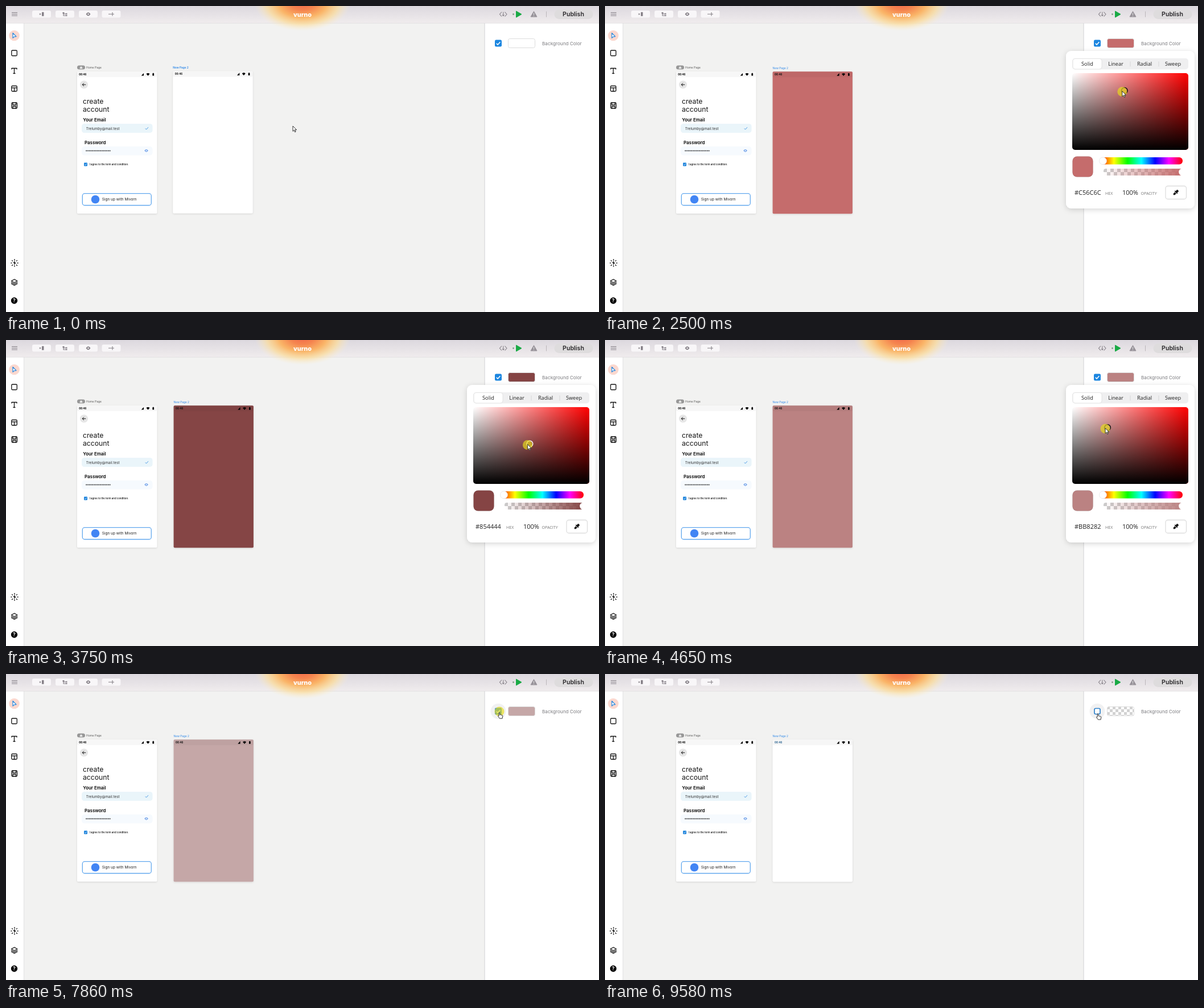
Recreate the animation shown at these times as an HTML page. Size 1042 by 538 pixels, loop 9.65 s.

```html
<!DOCTYPE html>
<html lang="en">
<head>
<meta charset="utf-8">
<title>Page background colour</title>
<style>
html, body { margin: 0; width: 100%; height: 100%; overflow: hidden; background: #f2f2f1; }
svg { display: block; width: 100vw; height: 100vh; font-family: Inter, Roboto, sans-serif; }
.line { fill: none; stroke: #111; stroke-width: 1.3; stroke-linejoin: round; stroke-linecap: round; }
.grey { fill: none; stroke: #858087; stroke-width: 1.1; }
.picker text { font-family: "Open Sans", "Noto Sans", sans-serif; }
</style>
</head>
<body>
<svg viewBox="0 0 1042 538">
  <defs>
    <linearGradient id="bar" x2="0" y2="1"><stop stop-color="#dcd8de"/><stop offset="1" stop-color="#f0eced"/></linearGradient>
    <radialGradient id="glow">
      <stop stop-color="#f26a4b"/><stop offset=".25" stop-color="#f5854f"/>
      <stop offset=".5" stop-color="#fab568"/><stop offset=".75" stop-color="#fbdc9c" stop-opacity=".75"/>
      <stop offset="1" stop-color="#faeccb" stop-opacity="0"/>
    </radialGradient>
    <linearGradient id="saturation"><stop stop-color="#fff"/><stop offset="1" stop-color="#f00"/></linearGradient>
    <linearGradient id="darkness" x2="0" y2="1"><stop stop-opacity="0"/><stop offset="1"/></linearGradient>
    <linearGradient id="hue">
      <stop stop-color="#f00"/><stop offset=".167" stop-color="#ff0"/><stop offset=".333" stop-color="#0f0"/>
      <stop offset=".5" stop-color="#0ff"/><stop offset=".667" stop-color="#00f"/>
      <stop offset=".833" stop-color="#f0f"/><stop offset="1" stop-color="#f00"/>
    </linearGradient>
    <linearGradient id="alpha">
      <stop id="alphaStart" stop-opacity="0"/><stop id="alphaEnd" offset="1"/>
    </linearGradient>
    <pattern id="checker" width="12" height="12" patternUnits="userSpaceOnUse" x="876" y="286">
      <rect width="12" height="12" fill="#fff"/><path d="M0 0h6v6h-6zM6 6h6v6h-6z" fill="#ccc"/>
    </pattern>
    <pattern id="smallChecker" width="10" height="10" patternUnits="userSpaceOnUse" x="882" y="57">
      <rect width="10" height="10" fill="#fff"/><path d="M0 0h5v5h-5zM5 5h5v5h-5z" fill="#d2d2d2"/>
    </pattern>
    <filter id="soft" x="-20%" y="-20%" width="140%" height="140%">
      <feDropShadow dx="0" dy="1" stdDeviation="1.5" flood-opacity=".13"/>
    </filter>
    <filter id="deep" x="-20%" y="-20%" width="140%" height="140%">
      <feDropShadow dx="0" dy="2" stdDeviation="5" flood-opacity=".17"/>
    </filter>
    <g id="signals">
      <path d="M117 7.5v-4.6l-4.3 4.6zM121.5 4.3q3-2.7 6 0l-3 3.4zM132.4 3.4h.7v-.6h1.3v.6h.7v4.2h-2.7z"/>
    </g>
  </defs>

  <rect width="1042" height="538" fill="#f2f2f1"/>
  <rect y="30" width="31" height="508" fill="#fff"/>
  <path d="M31.5 30V538" stroke="#e2e2e2"/>
  <rect x="841" y="30" width="201" height="508" fill="#fff"/>
  <path d="M841 30V538" stroke="#d9d9dc" stroke-width="1.3"/>
  <rect width="1042" height="30" fill="url(#bar)"/>
  <path d="M0 30.2H1042" stroke="#dedbdd" stroke-width=".8"/>
  <ellipse cx="521" cy="-4" rx="84" ry="48" fill="url(#glow)"/>
  <text x="521" y="18.5" font-size="11" font-weight="800" fill="#fff" text-anchor="middle">vurno</text>

  <path class="grey" d="M10 11.5h10M10 14.2h10M10 17h10"/>
  <g fill="#f8f6f8">
    <rect x="46" y="8" width="33" height="12.5" rx="3"/><rect x="87" y="8" width="33" height="12.5" rx="3"/>
    <rect x="128" y="8" width="33" height="12.5" rx="3"/><rect x="168.500" y="8" width="33" height="12.5" rx="3"/>
  </g>
  <g fill="#858087">
    <rect x="63" y="10.800" width="3.500" height="7" rx=".6"/>
    <path d="M99.500 11h3v2.400h-3zM104.500 12.800h3v2h-3zM104.500 15.800h3v2h-3z"/>
    <path d="M140.500 14.300q4-6 8 0q-4 6-8 0z"/>
  </g>
  <circle cx="144.500" cy="14.300" r="1.200" fill="#f8f6f8"/>
  <path class="grey" d="M58.500 14.300h3M60 12.800v3M101 13v4h3.500M101 14h3.500M180 14.300h10M187 11v6.600"/>
  <path class="grey" d="M871 10.500l-3.500 4l3.500 4M876.500 10.500l3.500 4l-3.500 4M873.800 10.500v7M872 15.500l1.800 2l1.800-2"/>
  <circle cx="891.500" cy="14.500" r="1.400" fill="#85a08a"/>
  <path d="M896.500 9v11l9.500-5.500z" fill="#19aa45" stroke="#19aa45" stroke-linejoin="round"/>
  <path d="M927.500 9.500l5.500 9.500h-11z" fill="#98939a" stroke="#98939a" stroke-linejoin="round"/>
  <path d="M927.500 12.500v3.300M927.500 17v1" stroke="#eee"/>
  <path d="M949.500 9.500v10" stroke="#bbb6ba"/>
  <rect x="963.500" y="6" width="68" height="17" rx="8.500" fill="#dedcdd"/>
  <text x="997" y="18.300" font-size="10.600" font-weight="600" fill="#29272a" text-anchor="middle">Publish</text>

  <circle cx="14.500" cy="52" r="9.300" fill="#fbd8cf"/>
  <path d="M12 47.500v8.800l2.300-2.200l3.700-.5z" fill="#fff" stroke="#2688df" stroke-width="1.200" stroke-linejoin="round"/>
  <g class="line">
    <rect x="9.800" y="78" width="9.500" height="9.500" rx="1.500"/>
    <path d="M10 111v-1.500h9v1.500M14.500 109.500v9M13 118.500h3"/>
    <rect x="9.800" y="140.500" width="9.500" height="9.500" rx="1.500"/><path d="M10 143.800h9M14.500 143.800v6"/>
    <rect x="10" y="170" width="9.500" height="10" rx="1.500"/><path d="M12 170v4h5.500v-4M12 180v-3.500h5.500v3.500"/>
    <path d="M9.500 483.500l5.200-3l5.200 3l-5.200 3zM9.500 486l5.200 3l5.200-3M9.500 488.300l5.200 3l5.200-3"/>
    <g id="rays"></g>
  </g>
  <path d="M15.800 447.500l-3.300 4.500h2.200l-.6 4l3.500-5h-2.300z"/>
  <circle cx="14.500" cy="518" r="5.700"/>
  <text x="14.500" y="521.200" font-size="8.500" font-weight="700" fill="#fff" text-anchor="middle">?</text>

  <rect x="125" y="104.500" width="14" height="7" rx="3.500" fill="#979797"/>
  <path d="M129.800 108l2.200-2l2.200 2v2.200h-4.400z" fill="#e8e8e8"/>
  <text x="141" y="110" font-size="4.900" fill="#555">Home Page</text>
  <g transform="translate(125 115)">
    <rect width="140.300" height="250" rx="2" fill="#fff" filter="url(#soft)"/>
    <rect width="140.300" height="10" rx="2" fill="#f7f7f7"/>
    <text x="3.200" y="7" font-size="4.400" font-weight="700">00:46</text>
    <use href="#signals"/>
    <circle cx="12" cy="23.300" r="7" fill="#e6e6e6"/>
    <path class="line" style="stroke-width:1" d="M14.800 23.300h-5.500M11.600 20.900l-2.400 2.400l2.400 2.400"/>
    <g font-size="12.200" fill="#161616"><text x="10" y="56.500">create</text><text x="10" y="70.500">account</text></g>
    <g font-size="7.900" font-weight="600"><text x="10.300" y="87.800">Your Email</text><text x="13" y="128.200">Password</text></g>
    <rect x="8" y="92" width="124.500" height="16" rx="4.500" fill="#eaf5fa"/>
    <text x="15.800" y="102.600" font-size="6.300" fill="#333">Trelumby@mail.test</text>
    <path d="M119.800 100.300l1.700 1.800l3.500-3.900" fill="none" stroke="#4c9be6"/>
    <rect x="8" y="132" width="124.500" height="15.500" rx="4.500" fill="#f6fafe"/>
    <g id="dots" fill="#222"></g>
    <path d="M118.300 139.300q3.300-4.800 6.600 0q-3.300 4.800-6.600 0z" fill="#6f9fe8"/>
    <circle cx="121.600" cy="139.300" r="1.200" fill="#dceafc"/>
    <rect x="12" y="160.500" width="6" height="6" rx="1" fill="#1d83dc"/>
    <path d="M13.300 163.600l1.300 1.300l2.300-2.700" fill="none" stroke="#fff" stroke-width=".8"/>
    <text x="21.700" y="165.100" font-size="4.350" font-weight="500">I agree to the term and condition.</text>
    <rect x="9.300" y="214.700" width="121" height="20.800" rx="4" fill="#fff" stroke="#62a8ee" stroke-width="1.300"/>
    <circle cx="32" cy="225" r="7.300" fill="#4285f4"/>
    <text x="43.700" y="227.200" font-size="6.500" fill="#222">Sign up with Mivorn</text>
  </g>

  <g id="page">
    <text id="pageLabel" y="-4" font-size="4.800" fill="#2a86e8">New Page 2</text>
    <rect id="pageFill" width="140.300" height="250" rx="2" filter="url(#soft)"/>
    <rect width="140.300" height="10" rx="2" fill-opacity=".035"/>
    <text id="pageTime" x="3.500" y="6.800" font-size="4.400" font-weight="700">00:46</text>
    <use href="#signals"/>
  </g>

  <circle id="halo" cx="865" cy="65.500" r="13.500" fill="#f1f1f2"/>
  <g id="checked">
    <rect x="859" y="59.500" width="12" height="12" rx="2.200" fill="#1c86e0"/>
    <path d="M861.800 65.700l2.300 2.400l4.300-4.800" fill="none" stroke="#fff" stroke-width="1.500"/>
  </g>
  <rect id="unchecked" x="860" y="60.500" width="10" height="10" rx="2.200" fill="#fff" stroke="#2f82cb" stroke-width="1.700"/>
  <rect id="swatch" x="882.500" y="57.500" width="47" height="16" rx="3" stroke="#dcdcdc"/>
  <text x="942" y="68.500" font-size="8.200" fill="#7d7d80">Background Color</text>

  <g id="picker" class="picker">
    <rect x="810" y="79" width="226" height="277" rx="9" fill="#fff" filter="url(#deep)"/>
    <rect x="821" y="92" width="204" height="19.500" rx="5" fill="#efeff0"/>
    <rect x="822" y="92.500" width="51" height="18.500" rx="4" fill="#fff" stroke="#dedede" stroke-width=".8"/>
    <path d="M923 97.500v9M973 97.500v9" stroke="#d2d2d2" stroke-width=".8"/>
    <g font-size="9.200" fill="#222" text-anchor="middle">
      <text x="847.500" y="105.300">Solid</text><text x="897.500" y="105.300">Linear</text>
      <text x="948" y="105.300">Radial</text><text x="998" y="105.300">Sweep</text>
    </g>
    <rect x="821" y="118" width="204" height="135" rx="5" fill="url(#saturation)"/>
    <rect x="821" y="118" width="204" height="135" rx="5" fill="url(#darkness)"/>
    <circle id="ring" r="5.300" fill="none" stroke-width="1.500"/>
    <rect id="chip" x="821.500" y="264.500" width="36" height="36" rx="8" stroke="#0002" stroke-width=".7"/>
    <rect x="870" y="266" width="145" height="12.500" rx="6" fill="url(#hue)"/>
    <circle cx="875" cy="272.300" r="6.500" fill="#fff" stroke="#ddd" stroke-width=".6"/>
    <rect x="876" y="286" width="139" height="12" rx="4" fill="url(#checker)"/>
    <rect x="876" y="286" width="139" height="12" rx="4" fill="url(#alpha)"/>
    <circle cx="1014.500" cy="292" r="6.300" fill="#fff"/>
    <g font-size="11" fill="#222"><text id="hex" x="825" y="332"></text><text x="909" y="332">100%</text></g>
    <g font-size="7.100" fill="#777"><text x="879" y="331.800">HEX</text><text x="941.500" y="331.800">OPACITY</text></g>
    <rect x="985" y="316.500" width="36.500" height="23" rx="4" fill="#fff" stroke="#ddd" stroke-width="1.300"/>
    <g transform="translate(1003 328) rotate(45)"><path d="M-2-5.500h4v4h1.300v1.500h-6.600v-1.500h1.300zM-1.800.7h3.600v3.500l-1.800 1.800l-1.800-1.800z" fill="#111"/></g>
  </g>

  <circle id="press" r="8.500" fill="#e8dc1e" fill-opacity=".68"/>
  <g id="arrow"><path d="M0 0v9.300l2.200-2l1.500 3.400l1.500-.7l-1.500-3.300h3z" fill="#fff" stroke="#222" stroke-width=".9" stroke-linejoin="round"/></g>
  <g id="hand"><path d="M-.8 6.500v-5.300q.8-1.500 1.700 0v3.300l4 1q1 .4.900 1.500l-.7 4.200h-4.700l-2.900-4.200q.3-1.300 1.700-.5z" fill="#fff" stroke="#222" stroke-width=".9" stroke-linejoin="round"/></g>
</svg>
<script>
const LOOP = 9650;
const $ = id => document.getElementById(id);
const set = (id, attrs) => Object.entries(attrs).forEach(([k, v]) => $(id).setAttribute(k, v));
const show = (id, on) => { $(id).style.display = on ? "" : "none"; };
const between = (t, a, b) => t >= a && t < b;

// Each stop is [time, x, y].
const cursorStops = [
  [0, 504, 211], [70, 504, 211], [770, 314, 109], [840, 313, 108], [910, 314, 109], [1050, 314, 109],
  [1820, 902, 60], [2020, 902, 60], [2450, 904, 146]
];
const ringStops = [
  [2450, 908, 145], [2980, 958, 184], [3330, 934, 194], [3950, 914, 177],
  [4400, 892, 160], [4650, 883.3, 154], [4780, 852, 148.500]
];
const exitStops = [
  [4780, 849, 149], [5520, 849, 149], [6420, 694.500, 168], [6700, 694.500, 168], [6840, 636, 162],
  [7240, 886, 70], [7380, 886, 70], [7590, 867, 67], [8280, 867, 67], [8360, 866, 69]
];
const presses = [[770, 980], [1900, 2020], [2450, 5050], [6590, 6660], [7860, 8070], [8690, 8900], [9370, 9510]];

function follow(stops, t, ease = u => u * u * (3 - 2 * u)) {
  const next = stops.findIndex(s => s[0] > t);
  if (next === 0) return stops[0].slice(1);
  if (next < 0) return stops[stops.length - 1].slice(1);
  const [t0, x0, y0] = stops[next - 1], [t1, x1, y1] = stops[next];
  const u = ease((t - t0) / (t1 - t0));
  return [x0 + (x1 - x0) * u, y0 + (y1 - y0) * u];
}

function pickedHex([x, y]) {
  const value = 255 * (1 - (y - 118) / 134.500);
  const low = value * (1 - (x - 821) / 204);
  const byte = n => Math.round(n).toString(16).padStart(2, "0").toUpperCase();
  return "#" + byte(value) + byte(low) + byte(low);
}

function render(t) {
  const dragged = t >= 2450;
  const ring = dragged ? follow(ringStops, t, u => u) : [821, 118];
  const color = pickedHex(ring);
  const enabled = t < 7930 || between(t, 8760, 9440);

  const cursor = t < 2450 ? follow(cursorStops, t)
    : t < 4780 ? [ring[0] - 4, ring[1] + 1] : follow(exitStops, t);
  const position = `translate(${cursor})`;
  const overCheckbox = t >= 7450;
  set("arrow", { transform: position });
  set("hand", { transform: position });
  set("press", { cx: cursor[0], cy: cursor[1] + (overCheckbox ? -1 : 1) });
  show("arrow", !overCheckbox);
  show("hand", overCheckbox);
  show("halo", overCheckbox);
  show("press", presses.some(([a, b]) => between(t, a, b)));

  const moved = t >= 840;
  set("page", { transform: moved ? "translate(294.600 115.200)" : "translate(293.300 114.400)" });
  set("pageLabel", { "font-weight": moved ? 400 : 600 });
  set("pageFill", { fill: enabled ? color : "#fff" });
  set("pageTime", { fill: enabled ? "#111" : "#28628f" });
  set("swatch", { fill: enabled ? color : "url(#smallChecker)" });
  show("checked", enabled);
  show("unchecked", !enabled);

  show("picker", between(t, 1950, 6630));
  set("ring", { cx: ring[0], cy: ring[1], stroke: ring[1] > 172 ? "#fff" : "#111" });
  set("chip", { fill: color });
  set("alphaStart", { "stop-color": color });
  set("alphaEnd", { "stop-color": color });
  $("hex").textContent = color;
}

$("dots").innerHTML = Array.from({ length: 16 }, (_, i) =>
  `<circle cx="${16.200 + i * 2.760}" cy="139.500" r=".95"/>`).join("");
$("rays").innerHTML = Array.from({ length: 8 }, (_, i) =>
  `<path d="M15 447v-1.500" transform="rotate(${i * 45} 15 451.800)"/>`).join("");

const start = performance.now();
function frame() {
  render((performance.now() - start) % LOOP);
  requestAnimationFrame(frame);
}
frame();
</script>
</body>
</html>
```
